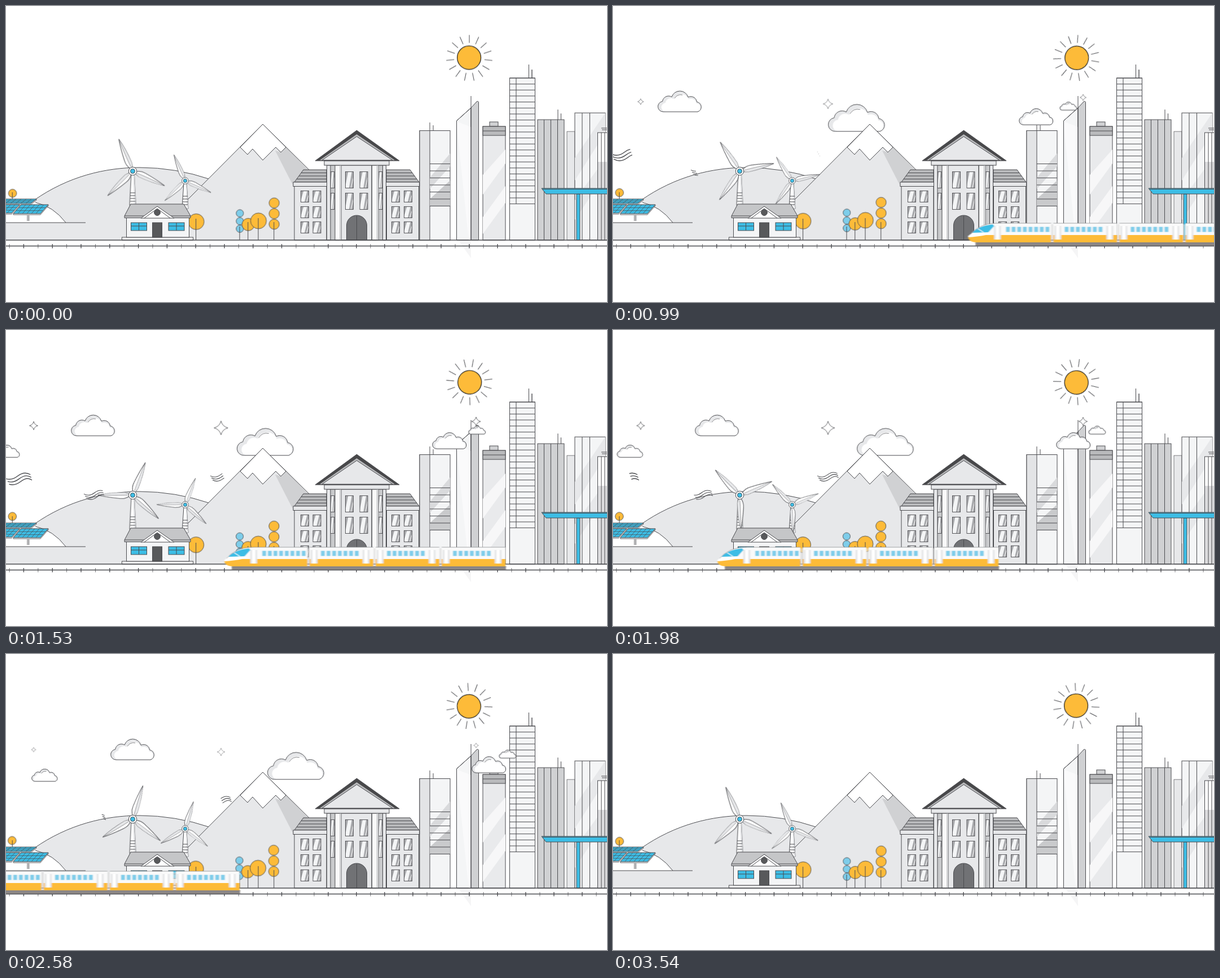
Animation, 1065 px wide and 526 px high, one loop 3570 ms. Source, as an HTML page:

```html
<!DOCTYPE html>
<html lang="en">
<head>
<meta charset="utf-8">
<title>Town with a passing train</title>
<style>
  html, body { margin: 0; width: 100%; height: 100%; overflow: hidden; background: #fff; }
  svg { display: block; width: 1065px; height: 526px; }
  .spin, .turbine, .drift, .train, .star, .wind, .sway { animation: 3570ms linear infinite; }
  .spin { animation-name: spin; }
  .turbine { animation-name: turn; }
  .train { animation-name: ride; }
  .drift { animation-name: drift, fade; }
  .star { animation-name: twinkle; }
  .sway { animation-name: sway; }
  .wind { stroke-dasharray: 1 2; fill: none; }
  .w1 { animation-name: wind1; }
  .w2 { animation-name: wind2; }
  .w3 { animation-name: wind3; }
  @keyframes spin { to { transform: rotate(360deg); } }
  @keyframes turn { 99.16%, 100% { transform: rotate(360deg); } }
  @keyframes ride { from { transform: translateX(1074px); } to { transform: translateX(-528px); } }
  @keyframes drift { to { transform: translateX(var(--d)); } }
  @keyframes fade { 0%, 92%, 100% { opacity: 0; } 11%, 81% { opacity: 1; } }
  @keyframes twinkle {
    0%, 8.4% { transform: scale(0); animation-timing-function: cubic-bezier(.61, 1, .88, 1); }
    47.6% { transform: scale(1); animation-timing-function: cubic-bezier(.12, 0, .39, 0); }
    86.8%, 100% { transform: scale(0); }
  }
  @keyframes sway {
    0%, 100% { transform: translate(.4px, .8px); }
    25% { transform: translate(.3px, -.2px); }
    50% { transform: translate(0, -.9px); }
    75% { transform: translate(-.5px, -.5px); }
  }
  @keyframes wind1 {
    0%, 9.8% { stroke-dashoffset: 1.02; }
    34%, 41% { stroke-dashoffset: 0; }
    62%, 100% { stroke-dashoffset: -1.02; }
  }
  @keyframes wind2 {
    0%, 22% { stroke-dashoffset: 1.02; }
    45%, 52% { stroke-dashoffset: 0; }
    76%, 100% { stroke-dashoffset: -1.02; }
  }
  @keyframes wind3 {
    0%, 27% { stroke-dashoffset: 1.02; }
    53%, 56% { stroke-dashoffset: 0; }
    88%, 100% { stroke-dashoffset: -1.02; }
  }
</style>
</head>
<body>
<svg id="scene" viewBox="0 0 1065 526" fill="none" stroke="#4a4b4f" stroke-width="1"></svg>
<script>
const PALE = '#f4f5f6', LIGHT = '#e7e8ea', MID = '#d0d1d3', GREY = '#b9babc', DARK = '#58595b';
const BLUE = '#3dbde5', SKY = '#7ecdea', GOLD = '#fdbb39';
const NONE = 'stroke="none"';

const rect = (x, y, w, h, fill, more = '') =>
  `<rect x="${x}" y="${y}" width="${w}" height="${h}" fill="${fill}" ${more}/>`;
const poly = (pts, fill, more = '') => `<polygon points="${pts}" fill="${fill}" ${more}/>`;
const disc = (x, y, r, fill, more = '') => `<circle cx="${x}" cy="${y}" r="${r}" fill="${fill}" ${more}/>`;
const path = (d, fill = 'none', more = '') => `<path d="${d}" fill="${fill}" ${more}/>`;
const at = (x, y, inner, scale = 1) => `<g transform="translate(${x} ${y}) scale(${scale})">${inner}</g>`;
const rep = (n, f) => Array.from({ length: n }, (_, i) => f(i)).join('');
const each = (list, f) => list.map(f).join('');
const vert = (x, y1, y2) => path(`M${x} ${y1}V${y2}`);
const horiz = (x1, x2, y) => path(`M${x1} ${y}H${x2}`);

function sun() {
  const rays = rep(15, i => `<path d="M0-27V-41" transform="rotate(${i * 24})"/>`);
  return at(821, 92.5, `<g class="spin">${rays}${disc(-.4, -.7, 21, GOLD, 'stroke="#222" stroke-width="1.2"')}</g>`);
}

function cloud(x, y, scale, dist) {
  const d = 'M9 36A9.3 9.3 0 0 1 7.5 17.5A11 11 0 0 1 24 9.5A15.2 15.2 0 0 1 53 10A10.8 10.8 0 0 1 68.5 18.5A9 9 0 0 1 70 36Z';
  const body = path(d, LIGHT, NONE)
    + path(d, '#fff', NONE + ' transform="translate(6 5) scale(.9 .86)"')
    + path(d, 'none', 'vector-effect="non-scaling-stroke"')
    + path('M29 12Q34 4 43 6', 'none', 'vector-effect="non-scaling-stroke" stroke-width=".7"');
  return `<g class="drift" style="--d:${dist}px">${at(x, y, body, scale)}</g>`;
}

const star = (x, y, r) => at(x, y, `<g class="star">${path(
  `M0 ${-r}Q${r * .2} ${-r * .2} ${r} 0Q${r * .2} ${r * .2} 0 ${r}Q${-r * .2} ${r * .2} ${-r} 0Q${-r * .2} ${-r * .2} 0 ${-r}Z`,
  '#fff', 'stroke-width=".9"')}</g>`);

const wind = (x, y, n, scale) => at(x, y, rep(3, i =>
  `<path class="wind w${n}" pathLength="1" d="M${i * 2} ${7 + i * 3.6}q9 5 18 -2t${17 - i} -2"/>`), scale);

function turbine(x, y, scale, base) {
  const blade = path('M6-2Q13-7 22-6Q45-4 62 0Q40 4.8 14 4.5L6 2Z', '#fff')
    + path('M8 0Q30-1 62 0Q40 4.8 14 4.5L7 2Z', LIGHT, NONE)
    + path('M8 0Q30-1 62 0', 'none', 'stroke-width=".5"');
  const blades = each([-113.5, 24.5, 135.5], a => `<g transform="rotate(${a})">${blade}</g>`);
  const h = base - y;
  const tower = poly(`-2.5,4 2.5,4 5.5,${h} -5.5,${h}`, '#fff')
    + poly(`1,4 2.5,4 5.5,${h} 2,${h}`, LIGHT, NONE)
    + rep(4, i => horiz(-4.5, 4.5, h - 22 + i * 5));
  return at(x, y, tower + `<g transform="scale(${scale})"><g class="turbine">${blades}</g>${disc(0, 0, 7.2, '#fff')}${disc(0, 0, 4, BLUE)}</g>`);
}

const tree = (x, trunk, base, crowns, fill) =>
  `<g class="sway">${each(crowns, ([y, r]) => disc(x, y, r, fill, 'stroke-width=".9"'))}</g>` + vert(x, trunk, base);

function panel(x, y, w, h, skew) {
  const pt = (u, v) => `${x + u * w + (1 - v) * skew} ${y + v * h}`;
  return path(`M${pt(0, 0)}L${pt(1, 0)}L${pt(1, 1)}L${pt(0, 1)}Z`, BLUE)
    + rep(5, i => path(`M${pt((i + 1) / 6, 0)}L${pt((i + 1) / 6, 1)}`, 'none', 'stroke-width=".7"'))
    + rep(2, i => path(`M${pt(0, (i + 1) / 3)}L${pt(1, (i + 1) / 3)}`, 'none', 'stroke-width=".7"'))
    + path(`M${pt(0, 1)}v2H${x + w}L${x + w + skew} ${y + 2}v-2`, 'none', 'stroke-width=".8"');
}

function hills() {
  return path('M-30 416Q10 372 50 345C110 303 175 287 237 287Q300 287 362 308V416Z', LIGHT, NONE)
    + path('M50 345C110 303 175 287 237 287Q300 287 362 308')
    + path('M0 345Q40 343 60 351Q90 363 106 385H0Z', '#fff', NONE)
    + path('M52 349Q84 356 106 385M0 385H141')
    + cloud(331, 176, 1.3, 184)
    + poly('455,210 250,416 650,416 650,405', LIGHT, NONE)
    + poly('477,257 488,260 496,250 550,306 550,400', MID, NONE)
    + path('M317 349L455 210L542 296')
    + poly('455,210 415,251 428,264 437,254 455,274 478,251 487,260 496,251', '#fff');
}

function solar() {
  return tree(11.2, 331, 343, [[332, 7.2]], GOLD)
    + panel(-10, 343, 54, 8, 10) + panel(-38, 353, 48, 15, 14) + panel(13, 353, 48, 16, 14)
    + path('M38 372V382M40.5 372V382');
}

function house() {
  const pane = x => rect(x, 385, 28, 14, BLUE) + path(`M${x} 391h28M${x + 14} 385v14`);
  return tree(336.6, 378, 416, [[382.5, 14]], GOLD)
    + rect(205.5, 411, 126, 5, '#fff') + rect(213.5, 376, 111, 35, PALE)
    + poly('221,352 315,352 327,373 327,376.5 210,376.5 210,373', '#c5c6c8') + horiz(210, 327, 373)
    + poly('239,377 268,356 298,377', '#fff') + path('M245 377L268 360L291 377')
    + disc(268, 367, 5.4, DARK) + pane(221.5) + pane(288) + rect(259.5, 385, 17, 26, DARK);
}

function trees() {
  return tree(414, 392, 416, [[367.5, 6.5], [381.5, 6.5], [395, 6.5]], SKY)
    + tree(428.8, 384, 416, [[387.5, 11]], GOLD)
    + tree(447, 377, 416, [[381, 14]], GOLD)
    + tree(474.8, 384, 416, [[349.2, 9], [368.2, 9], [387, 9]], GOLD);
}

const glass = (x, y, w, h) => rect(x, y, w, h, '#a9aaad', NONE)
  + poly(`${x + w * .35},${y} ${x + w * .8},${y} ${x + w * .45},${y + h} ${x},${y + h} ${x},${y + h * .85}`, PALE, NONE)
  + path(`M${x + w} ${y + h * .35}L${x + w * .7} ${y + h}`, 'none', 'stroke="#fff"')
  + rect(x, y, w, h, 'none', 'stroke-width=".9"');

function school() {
  const wing = (x, roof, slope) => rect(x, 320, 57, 96, LIGHT)
    + poly(roof, GREY)
    + rep(3, i => horiz(...slope(i), 296.5 + i * 5.5))
    + rect(x - 2, 313, 60, 7.5, LIGHT)
    + each([328.5, 356.5, 383.5], y => glass(x + (x < 600 ? 11.5 : 9), y, 14, 20) + glass(x + (x < 600 ? 33 : 31), y, 14, 20));
  const column = x => rect(x, 283, 11.5, 133, '#fafafa') + rect(x + 8, 283, 3.5, 133, MID, NONE);
  return wing(511, '527,291 568,291 568,313 511,313', i => [523 - i * 4, 568])
    + wing(674.5, '674,291 716,291 732,313 674,313', i => [674, 720 + i * 4])
    + rect(568.5, 283, 105, 133, '#c9cacc')
    + each([294.5, 332.5], y => glass(575, y, 7, 29) + glass(660, y, 7, 29))
    + rect(568.5, 283, 6.5, 133, LIGHT) + rect(667.5, 283, 6, 133, LIGHT)
    + rect(594, 283, 54, 133, LIGHT)
    + each([294.5, 332.5], y => glass(601.5, y, 14, 29) + glass(627, y, 14, 29))
    + column(583) + column(648.5)
    + path('M603.5 416V390A18 18 0 0 1 639.5 390V416Z', '#717275') + vert(621.5, 373, 416)
    + rect(564, 275, 115, 8, LIGHT)
    + poly('548,275 621.5,221 697,275', '#48484a')
    + poly('556,274 621.5,228 689,274', GREY, NONE)
    + poly('560,274 621.5,232 685,274', LIGHT);
}

function city() {
  const b1 = rect(733, 221.5, 54, 195, PALE) + rect(733, 221.5, 18, 195, '#e3e4e6')
    + poly('751,305 787,262 787,285 751,325', '#d9dadc', NONE)
    + poly('751,343 787,310 787,355 751,355', '#c9cacc', NONE)
    + rep(7, i => horiz(751, 787, 280.5 + i * 12.5))
    + vert(751, 207, 221) + vert(757, 212, 221);
  const b2 = poly('802,417 824,417 824,448', '#f5f5f6', NONE)
    + poly('798.5,416 798.5,204 824,181 824,416', PALE)
    + poly('798,205 824,215 824,416 820,416', '#fafafb', NONE)
    + path('M824 416V181L834 170Q837.5 168 837.5 172V416Z', MID)
    + path('M798.5 416V204L824 181V416', 'none') + vert(824, 160, 182);
  const b3 = rect(857, 206, 15, 8, MID) + rect(845, 214, 40, 202, '#e9eaec')
    + poly('845,300 885,255 885,280 845,335', '#f7f7f8', NONE)
    + poly('845,375 885,320 885,350 845,405', '#f7f7f8', NONE)
    + rect(845, 214, 40, 16, GREY) + horiz(845, 885, 222);
  const tower = rect(892.5, 128, 45, 288, PALE)
    + rep(22, i => horiz(892.5, 937.5, (128 + i * 10.65).toFixed(1)))
    + vert(904, 128, 352) + vert(926.5, 104, 128) + `<g stroke-width="1.4">${vert(932, 113, 128)}</g>`;
  const b5 = rect(942, 202, 47, 214, MID) + each([953.5, 965.5, 977.5], x => vert(x, 202, 416))
    + vert(978, 184, 202) + vert(983.5, 191, 202);
  const b7 = rect(994, 223, 14, 193, LIGHT, 'stroke-width=".7"') + rect(1008, 190, 54, 226, PALE)
    + poly('1008,270 1062,190 1062,225 1008,310', LIGHT, NONE)
    + poly('1008,345 1048,290 1048,320 1008,380', LIGHT, NONE)
    + each([1021, 1034.5], x => vert(x, 190, 416))
    + rect(1048.5, 225, 20, 191, '#fff') + rect(1049, 277, 20, 139, '#dcdcde', NONE)
    + vert(1055, 225, 416) + vert(1061, 225, 416) + path('M1055 217H1065M1056 220H1065');
  const platform = rect(1011, 334, 6, 82, BLUE)
    + poly('949,324 1068,324 1068,334 957,334', BLUE) + horiz(951, 1065, 325.5);
  return b1 + b2 + b3 + tower + b5 + b7 + platform;
}

function track() {
  const tick = (x, i) => `<path d="M${x} 423V430.5" stroke-width="${i % 2 ? 1.4 : .8}"/>`;
  return `<g stroke-width="1.3">${horiz(0, 1065, 416)}${horiz(0, 1065, 426.5)}</g>`
    + rep(21, i => tick(6 + i * 25.4, i)) + rep(21, i => tick(546 + i * 25, i));
}

function train() {
  const door = x => rect(x, 391, 12, 24, '#e3e4e6') + rect(x + 3, 391, 6, 24, '#fff');
  const panes = (x, n) => rep(n, i => rect(x + i * 10, 392.5, 7, 9, SKY));
  const front = path('M0 412Q4 402 20 393Q34 386 52 386H147V408H0Z', '#fafafa')
    + path('M0 412Q1 407 6 407H147V420H14Q2 419 0 412Z', GOLD)
    + path('M0 411Q1 405 10 403L40 404Q30 409 0 411Z', '#fff')
    + path('M7 403Q18 391 44 388L46 391L36 402Z', BLUE)
    + path('M17 395.5L27 402', 'none', 'stroke="#fff" stroke-width="1.2"')
    + panes(67, 8) + door(46);
  const car = x => rect(x, 386, 113, 21, '#fafafa') + rect(x, 407, 113, 13, GOLD)
    + panes(x + 20, 7) + door(x + 2) + door(x + 94);
  const cars = each([151, 268, 385], x => rect(x - 4, 388, 4, 32, '#d5d5d5', 'opacity=".55"') + car(x));
  const top = 'M52 386H147' + each([151, 268, 385], x => `M${x} 386h113`);
  return `<g class="train" filter="url(#blur)" stroke="none">`
    + rect(13, 419, 486, 7, '#8b8685') + front + cars
    + path(`M4 406Q10 398 22 392Q34 386 52 386${top}`, 'none', 'stroke="#8f9093" stroke-width=".8"') + '</g>';
}

document.getElementById('scene').innerHTML =
  '<defs><filter id="blur" x="-5%" y="-10%" width="110%" height="120%"><feGaussianBlur stdDeviation="1.1 0.2"/></filter></defs>'
  + sun() + hills() + cloud(14, 152, 1, 238) + cloud(-119, 205, .59, 228)
  + solar() + turbine(224.5, 293.5, 1, 354) + turbine(317.5, 310.5, .81, 360)
  + wind(-4, 253, 1, 1.35) + wind(138, 284, 2, 1.05) + wind(362, 252, 3, 1.02)
  + house() + trees() + city() + school()
  + cloud(654, 183, .78, 238) + cloud(741, 171, .39, 184)
  + star(49, 170, 7.5) + star(381, 174, 12.5) + star(833, 162.5, 8)
  + track() + train();
</script>
</body>
</html>
```
